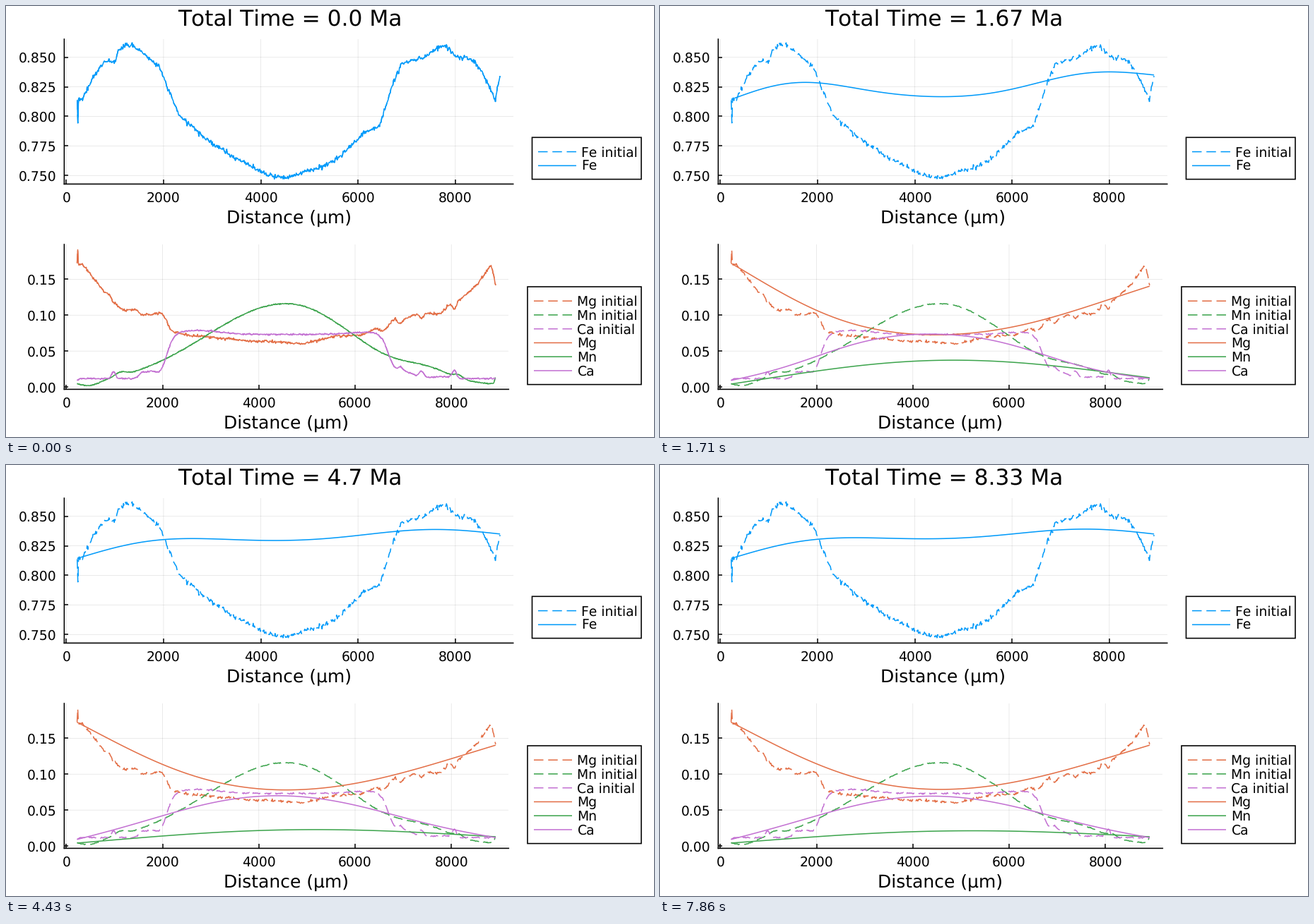
These frames come from a looping animation (917 by 611 pixels, 8000 ms). A matplotlib script:

```python
import numpy as np
import matplotlib.pyplot as plt
from matplotlib.animation import FuncAnimation
from matplotlib.lines import Line2D
from matplotlib.patches import Rectangle

W, H, DPI = 917, 611, 100
PX = 72 / DPI                      # points per pixel
STATES, SUBSTEPS = 56, 6
DT = 15 / 99                       # Ma per state
TICK, TICKS = 40, 200              # ms per drawn frame, frames per loop

plt.rcParams.update({
    "font.family": "DejaVu Sans",
    "text.hinting": "none",
    "text.kerning_factor": 6,
    "path.simplify": False,
    "path.snap": False,
    "lines.scale_dashes": False,
})

COLORS = {"Fe": "#009afa", "Mg": "#e36f47", "Mn": "#3da44d", "Ca": "#c371d2"}

# Corners of the iron profile: distance (um), mole fraction
FE_KEYS = [(225, .815), (340, .815), (560, .834), (800, .847), (1010, .846),
           (1070, .8555), (1250, .861), (1420, .859), (1640, .851), (1900, .842),
           (2040, .829), (2320, .801), (2870, .781), (3410, .766), (4180, .7495),
           (4560, .7485), (5220, .757), (5620, .766), (6150, .787), (6450, .793),
           (6740, .830), (6890, .845), (7330, .849), (7620, .858), (7800, .860),
           (8020, .850), (8310, .849), (8550, .838), (8820, .814), (8920, .835)]


def bump(x, center, width):
    return np.exp(-((x - center) / width) ** 2)


def rise(x, center, width):
    return (1 + np.tanh((x - center) / width)) / 2


def iron(x):
    return (np.interp(x, *zip(*FE_KEYS)) - 0.021 * bump(x, 240, 8)
            + 0.005 * bump(x, 3295, 8) - 0.004 * bump(x, 6835, 12))


def manganese(x):
    bell = 0.113 * bump(x, 4570, np.where(x < 4570, 2350, 2010))
    left = 0.005 * bump(x, 1130, 150) - 0.0063 * bump(x, 500, 290)
    right = 0.013 * bump(x, 7500, 700) + 0.004 * bump(x, 8150, 120)
    return 0.003 + bell + left + right + 0.009 * bump(x, 8915, 25)


def calcium(x):
    top = 0.0615 + 0.0055 * bump(x, 2700, 700) + 0.003 * bump(x, 6300, 600)
    plateau = top * rise(x, 2085, 150) * rise(-x, -6690, 150)
    left = (0.0095 * bump(x, 985, 60) + 0.005 * bump(x, 1564, 70)
            + 0.010 * bump(x, 1740, 180) - 0.0025 * bump(x, 225, 30))
    right = (0.010 * bump(x, 7000, 300) + 0.005 * bump(x, 6940, 50)
             + 0.008 * bump(x, 7380, 70) + 0.003 * bump(x, 7800, 250)
             + 0.011 * bump(x, 8060, 60))
    return 0.0117 + plateau + left + right


def profiles(x, scatter=0):
    """Start profiles, optionally with analytical scatter; Mg closes the sum."""
    rng = np.random.default_rng(4)
    n_fe, n_ca, n_mn = rng.normal(0, scatter, (3, x.size))
    c = {"Fe": iron(x) + n_fe,
         "Mn": manganese(x) + 0.3 * n_mn,
         "Ca": calcium(x) - 0.3 * n_fe + 0.4 * n_ca}
    c["Mg"] = 1 - sum(c.values())
    return c


def diffusivity(t):
    """Tracer coefficients of Mg, Mn, Fe, Ca in um2/Ma; cooling every 2 Ma."""
    stage = min(int(t / 2), 3)
    rt = 8.314 * (1173.15 - 50 * stage)
    p = (0.6 - 0.1 * stage) * 1e9
    d0 = np.array([1.1e-3, 5.1e-4, 6.4e-4]) * 1e-4
    ea = np.array([284500, 253420, 275410])
    dv = np.array([5.3, 6.0, 5.6]) * 1e-6
    d = d0 * np.exp(-(ea + p * dv) / rt) * 3.156e25
    return np.append(d, d[2] / 2)


def step(c, t, dt, dx):
    """One implicit step of coupled diffusion; columns of c are Mg, Mn, Ca."""
    n = len(c)
    d = diffusivity(t)
    free, dep = d[[0, 1, 3]], d[2]
    mid = (c[1:] + c[:-1]) / 2
    total = mid @ free + (1 - mid.sum(axis=1)) * dep
    coef = np.diag(free) - (free * mid / total[:, None])[:, :, None] * (free - dep)
    coef *= dt / dx**2
    eye = np.eye(3)
    m = np.zeros((n, 3, n, 3))
    m[0, :, 0] = m[-1, :, -1] = eye
    for i in range(1, n - 1):
        m[i, :, i - 1] = -coef[i - 1]
        m[i, :, i + 1] = -coef[i]
        m[i, :, i] = eye + coef[i - 1] + coef[i]
    return np.linalg.solve(m.reshape(3 * n, 3 * n), c.ravel()).reshape(n, 3)


def simulate(x):
    start = profiles(x)
    c = np.stack([start[k] for k in ("Mg", "Mn", "Ca")], axis=1)
    dt = DT / SUBSTEPS
    states = [c]
    for i in range((STATES - 1) * SUBSTEPS):
        c = step(c, (i + 0.5) * dt, dt, x[1] - x[0])
        if (i + 1) % SUBSTEPS == 0:
            states.append(c)
    return [{"Mg": s[:, 0], "Mn": s[:, 1], "Ca": s[:, 2], "Fe": 1 - s.sum(axis=1)}
            for s in states]


x_fine = np.linspace(225, 8920, 640)
x_sim = np.linspace(225, 8920, 120)
initial = profiles(x_fine, scatter=0.001)
states = simulate(x_sim)

fig = plt.figure(figsize=(W / DPI, H / DPI), dpi=DPI, facecolor="white")


def text(x, y, s, size, **kw):
    return fig.text(x / W, 1 - y / H, s, fontsize=size * PX, va="baseline", **kw)


def panel(left, top, right, bottom, ylim, yticks, fmt):
    ax = fig.add_axes([left / W, 1 - bottom / H, (right - left) / W, (bottom - top) / H])
    ax.set(xlim=(-42, 9190), ylim=ylim, xticks=range(0, 8001, 2000), yticks=yticks)
    ax.set_yticklabels([fmt % v for v in yticks])
    ax.spines[["top", "right"]].set_visible(False)
    ax.spines[["left", "bottom"]].set_linewidth(1.6 * PX)
    ax.tick_params(direction="in", length=6 * PX, width=1.5 * PX, labelsize=18.75 * PX)
    ax.tick_params(pad=11 * PX)
    ax.grid(color="black", alpha=0.1, linewidth=0.8 * PX)
    ax.set_axisbelow(True)
    text((left + right) / 2, bottom + 55.6, "Distance (µm)", 25, ha="center")
    return ax


def style(name, dashed):
    dash = (0, (13.5 * PX, 6.75 * PX)) if dashed else "-"
    return dict(color=COLORS[name], lw=1.55 * PX, ls=dash, dash_capstyle="butt",
                solid_capstyle="butt")


def legend(left, top, right, bottom, names, x_line, y_first):
    fig.add_artist(Rectangle((left / W, 1 - bottom / H), (right - left) / W,
                             (bottom - top) / H, fc="white", ec="black", lw=1.6 * PX))
    rows = [(k, True) for k in names] + [(k, False) for k in names]
    for i, (k, dashed) in enumerate(rows):
        y = y_first + 19.75 * i
        fig.add_artist(Line2D([x_line / W, (x_line + 54) / W], [1 - y / H] * 2,
                              **style(k, dashed)))
        text(x_line + 61.5, y + 6.7, k + " initial" * dashed, 18.75)


upper = panel(82.4, 47, 717.7, 252.4, (0.7428, 0.8653),
              [0.75, 0.775, 0.8, 0.825, 0.85], "%.3f")
lower = panel(82.4, 338, 711.3, 543.4, (-0.0032, 0.1985),
              [0, 0.05, 0.1, 0.15], "%.2f")
legend(744.5, 186.3, 899, 245.6, ["Fe"], 753, 206.6)
legend(738, 398, 899, 536.6, ["Mg", "Mn", "Ca"], 747, 418.2)
title = text(402, 27.5, "", 31.25, ha="center")

home = {"Fe": upper, "Mg": lower, "Mn": lower, "Ca": lower}
for k, ax in home.items():
    ax.plot(x_fine, initial[k], **style(k, True))
curves = {k: ax.plot([], [], **style(k, False))[0] for k, ax in home.items()}


def draw(frame):
    # seven states a second, switched at the nearest tick
    i = int((frame * TICK + 30) * 7 / 1000)
    title.set_text(f"Total Time = {round(i * DT, 2)} Ma")
    for k, line in curves.items():
        if i == 0:
            line.set_data(x_fine, initial[k])
        else:
            line.set_data(x_sim, states[i][k])
    return [title, *curves.values()]


anim = FuncAnimation(fig, draw, frames=TICKS, interval=TICK, repeat=True,
                     repeat_delay=0)
plt.show()
```
